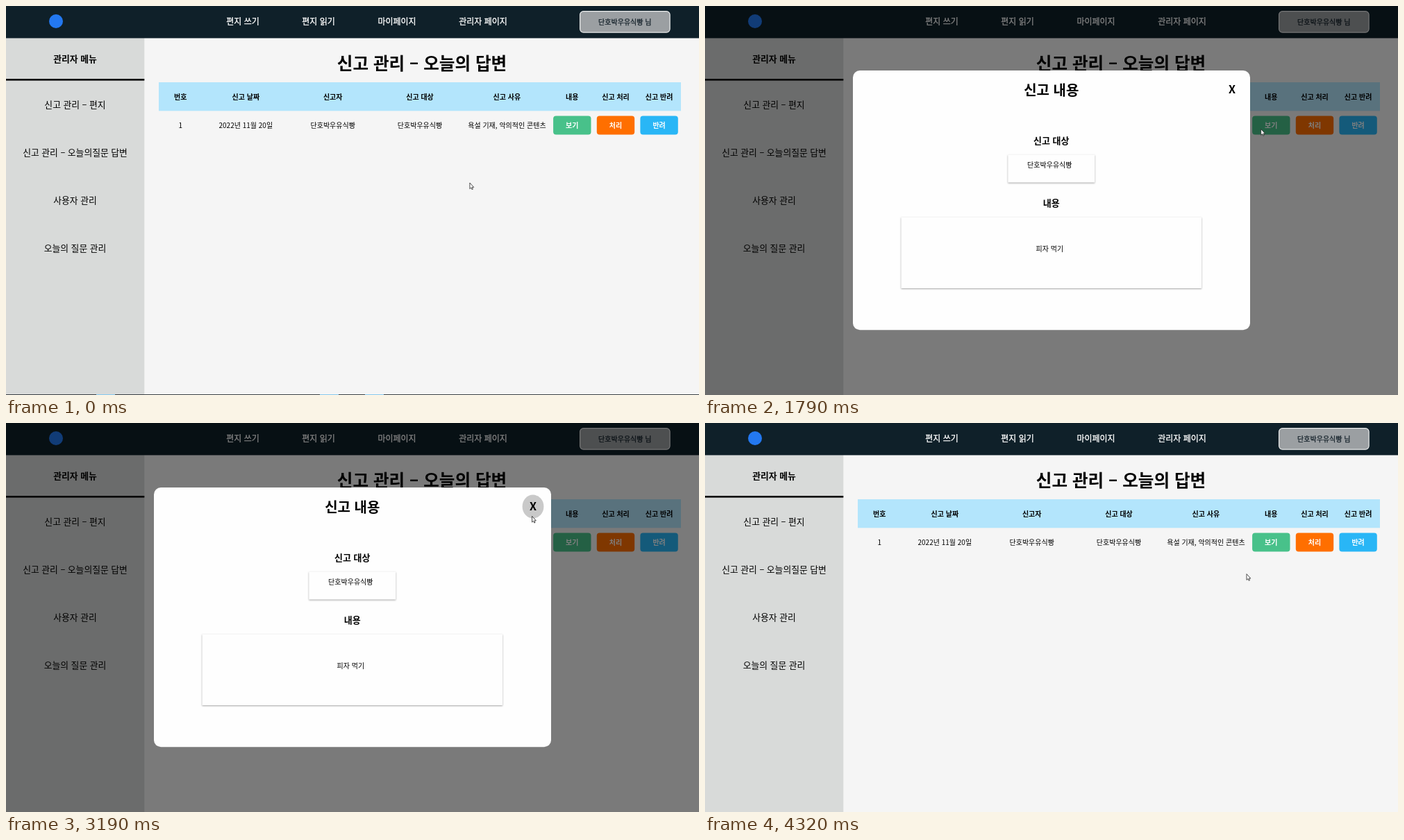
These frames come from a looping animation (998 px wide and 561 px high, 4.85 s). An HTML page:

```html
<!DOCTYPE html>
<html lang="ko">
<head>
<meta charset="utf-8">
<style>
  html, body { margin: 0; width: 100%; height: 100%; overflow: hidden; background: #f5f5f5; }
  svg { display: block; width: 998px; height: 561px; }
  text { font-family: "Noto Sans CJK KR", "Noto Sans CJK", "Noto Sans", sans-serif; text-anchor: middle; }
  .card { filter: drop-shadow(0 1.5px 1.2px rgba(0, 0, 0, .36)); }
</style>
</head>
<body>
<svg id="stage" viewBox="0 0 998 561"></svg>
<script>
const LOOP = 4850;
const USER = '단호박우유식빵';
const stage = document.getElementById('stage');

function add(parent, tag, attrs) {
  const el = document.createElementNS('http://www.w3.org/2000/svg', tag);
  for (const key in attrs) el.setAttribute(key, attrs[key]);
  return parent.appendChild(el);
}

const group = () => add(stage, 'g', {});

function box(parent, x, y, width, height, fill, rx = 0, more = {}) {
  return add(parent, 'rect', { x, y, width, height, fill, rx, ...more });
}

// Centres a line of text on (x, y); a thin outline stands in for medium weight.
function label(parent, str, x, y, size, weight = 400, fill = '#000') {
  const el = add(parent, 'text', {
    x, y: y + size * 0.37, 'font-size': size, 'font-weight': weight, fill
  });
  if (weight === 500) {
    el.setAttribute('stroke', fill);
    el.setAttribute('stroke-width', size * 0.025);
  }
  el.textContent = str;
}

// Page
const page = group();
box(page, 0, 0, 998, 561, '#f5f5f5');
box(page, 0, 46, 199.3, 515, '#d8dad9');
box(page, 0, 0, 998, 46.4, '#0f2029');
add(page, 'circle', { cx: 72, cy: 22, r: 10, fill: '#2378f0' });
[['편지 쓰기', 341], ['편지 읽기', 450], ['마이페이지', 563], ['관리자 페이지', 687]]
  .forEach(([str, x]) => label(page, str, x, 23, 12, 500, '#fff'));
box(page, 826.6, 7.6, 129.5, 30.5, '#9b9fa2', 5, { stroke: '#eceded', 'stroke-width': 1.2 });
label(page, USER + ' 님', 891.3, 23, 10, 500, '#14212a');

label(page, '관리자 메뉴', 99.5, 76, 12.8, 700);
box(page, 0, 105, 199.3, 2.6, '#000');
['신고 관리 – 편지', '신고 관리 – 오늘의질문 답변', '사용자 관리', '오늘의 질문 관리']
  .forEach((str, i) => label(page, str, 99.5, 142 + i * 69.2, 12.8));

label(page, '신고 관리 – 오늘의 답변', 599, 83, 24.6, 700);
box(page, 220, 110, 752, 41.3, '#b3e5fc');
[
  ['번호', 251.3, '1'],
  ['신고 날짜', 345.3, '2022년 11월 20일'],
  ['신고자', 470.7, USER],
  ['신고 대상', 596, USER],
  ['신고 사유', 721.4, '욕설 기재, 악의적인 콘텐츠'],
  ['내용', 815.3, '보기', '#48c18a'],
  ['신고 처리', 878, '처리', '#ff6f00'],
  ['신고 반려', 940.6, '반려', '#29b6f6']
].forEach(([head, x, cell, fill]) => {
  label(page, head, x, 131, 10, 700);
  if (fill) box(page, x - 27.2, 158.4, 54.4, 27.2, fill, 4);
  label(page, cell, x, 172.5, 10, fill ? 700 : 400, fill ? '#fff' : '#000');
});

// Strip along the bottom edge, seen briefly at the start
const strip = group();
box(strip, 0, 560, 998, 1, '#3b4044');
[130, 452, 517].forEach(x => box(strip, x, 560, 27, 1, '#86c8ee'));

// Dialog
const dialog = group();
box(dialog, 0, 0, 998, 561, 'rgba(0,0,0,.5)');
box(dialog, 213, 93, 572, 374.3, '#fefefe', 10);
const hover = add(dialog, 'ellipse', { cx: 759, cy: 120.5, rx: 15.4, ry: 16.9, fill: '#c9c9c9' });
label(dialog, 'X', 759, 120.3, 16, 700);
label(dialog, '신고 내용', 498.8, 121.5, 20, 700);
label(dialog, '신고 대상', 498.8, 194, 13, 700);
label(dialog, '내용', 498.8, 284, 13, 700);
box(dialog, 436.3, 214.5, 125, 40, '#fefefe', 0, { class: 'card' });
box(dialog, 282.5, 304.5, 432.5, 102.5, '#fefefe', 0, { class: 'card' });
label(dialog, USER, 496.3, 229, 10);
label(dialog, '피자 먹기', 496.3, 350, 10);

// Pointer
const pointer = group();
const click = add(pointer, 'circle', { r: 8, cy: -0.5, fill: 'rgba(238,224,40,.78)' });
add(pointer, 'path', {
  d: 'M.4 .5V9.2L2.3 7.4 3.6 10.2 4.9 9.6 3.7 6.9H6.2Z',
  fill: '#fff', stroke: '#222', 'stroke-width': 0.8, 'stroke-linejoin': 'round'
});

const smooth = p => p * p * (3 - 2 * p);
const slow = p => 1 - (1 - p) ** 2;
const even = p => p;

// Each move: first step, last step, number of steps, end point, easing
const START = [667.5, 254.5];
const MOVES = [
  [260, 720, 8, [773.5, 203], smooth],
  [790, 1250, 8, [800.3, 177], slow],
  [1920, 2110, 4, [795, 183], smooth],
  [2250, 2710, 8, [757, 144], smooth],
  [2840, 3260, 7, [757.2, 133.3], smooth],
  [3850, 3850, 1, [755.5, 139.3], even],
  [3920, 4190, 5, [777, 213], smooth],
  [4250, 4320, 2, [779.6, 217.2], even]
];

function pointerAt(t) {
  let from = START;
  for (const [first, last, count, to, ease] of MOVES) {
    if (t < first) break;
    const gap = count > 1 ? (last - first) / (count - 1) : 1;
    const step = Math.min(count, Math.floor((t - first) / gap + 1e-6) + 1);
    const p = ease(step / count);
    const at = from.map((v, i) => v + (to[i] - v) * p);
    if (step < count) return at;
    from = to;
  }
  return from;
}

const show = (el, on) => el.setAttribute('visibility', on ? 'inherit' : 'hidden');
const within = (t, a, b) => t >= a && t < b;

function draw(t) {
  const [x, y] = pointerAt(t);
  const open = within(t, 1790, 3850);
  pointer.setAttribute('transform', `translate(${x} ${y})`);
  show(strip, t < 70);
  show(dialog, open);
  show(hover, open && t > 2840 && y < 137.4);
  show(click, within(t, 1650, 1720) || within(t, 3720, 3850));
}

const begin = performance.now();
function tick() {
  draw((performance.now() - begin) % LOOP);
  requestAnimationFrame(tick);
}
draw(0);
requestAnimationFrame(tick);
</script>
</body>
</html>
```
